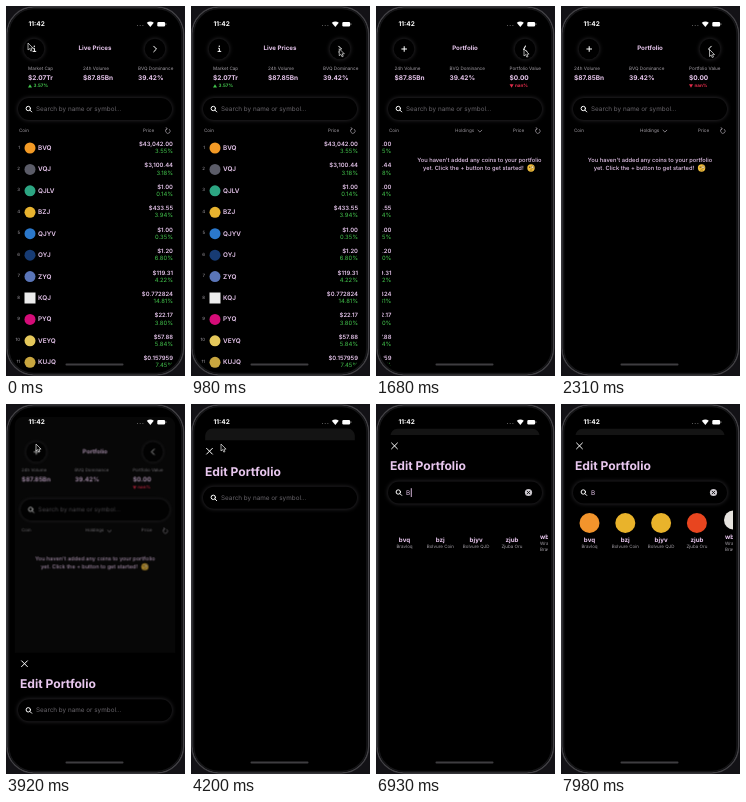
An HTML page for the animation above (8 s loop, 179 by 370 pixels).

```html
<!DOCTYPE html>
<html lang="en">
<head>
<meta charset="utf-8">
<title>Live Prices</title>
<style>
  html, body { margin: 0; width: 100%; height: 100%; overflow: hidden; background: #131216; }
  svg { display: block; width: 100%; height: 100%; }
  text { font-family: Inter, Roboto, sans-serif; dominant-baseline: central; text-rendering: geometricPrecision; }
  .glow { fill: #000; filter: drop-shadow(0 0 2.2px rgba(205, 195, 210, .25)); }
  .line { fill: none; stroke: #fff; stroke-width: 1; stroke-linecap: round; stroke-linejoin: round; }
</style>
</head>
<body>
<svg id="stage" viewBox="0 0 179 370"></svg>
<script>
const LOOP = 8000, STEP = 70;
const ACCENT = '#e8c7ee', GRAY = '#a5a0a8', DIM = '#68656b', GREEN = '#43c64d', RED = '#e22d4b';

const text = (x, y, str, size, fill, weight = 400, anchor = 'start') =>
  `<text x="${x}" y="${y}" font-size="${size}" fill="${fill}" font-weight="${weight}" text-anchor="${anchor}">${str}</text>`;
const disc = (x, y, r, fill) => `<circle cx="${x}" cy="${y}" r="${r}" fill="${fill}"/>`;
const line = (d, extra = '') => `<path class="line" d="${d}" ${extra}/>`;
const group = (id, content) => `<g id="${id}">${content}</g>`;

const coins = [
  ['BVQ', '43,042.00', '3.55', '#f39a25'],
  ['VQJ', '3,100.44', '3.18', '#5b5c68'],
  ['QJLV', '1.00', '0.14', '#2ca582'],
  ['BZJ', '433.55', '3.94', '#e8b32f'],
  ['QJYV', '1.00', '0.35', '#2b78cb'],
  ['OYJ', '1.20', '6.80', '#173b73'],
  ['ZYQ', '119.31', '4.22', '#5a75b8'],
  ['KQJ', '0.772824', '14.81', '#ececec'],
  ['PYQ', '22.17', '3.80', '#d50c78'],
  ['VEYQ', '57.88', '5.84', '#e5c85b'],
  ['KUJQ', '0.157959', '7.45', '#c9a63f']
];

const results = [
  ['bvq', 'Bravloq', '#f2942c'],
  ['bzj', 'Bolvure Coin', '#e9b32b'],
  ['bjyv', 'Bolvure QJD', '#e9b32b'],
  ['zjub', 'Zjuba Oru', '#e8451f']
];

const searchBar = (y, label) => `
  <rect class="glow" x="12" y="${y - 11}" width="154" height="22" rx="11"/>
  <circle class="line" cx="22.3" cy="${y - .5}" r="2.2"/>
  ${line(`M24 ${y + 1.2}l1.7 1.7`)}${label}`;
const placeholder = y => text(30, y, 'Search by name or symbol...', 6.35, DIM);

const stat = (x, label, value, change = '') =>
  text(x, 63, label, 4.6, GRAY) + text(x, 72, value, 6.5, ACCENT, 700) + change;

function coinRow([name, price, change, color], i) {
  const y = 142 + i * 21.43;
  const icon = name === 'KQJ'
    ? `<rect x="18.5" y="${y - 5.5}" width="11" height="11" fill="${color}"/>`
    : disc(24, y, 5.5, color);
  return text(14, y, i + 1, 4.4, GRAY, 400, 'end') + icon +
    text(32, y, name, 6.4, ACCENT, 600) +
    text(167, y - 3.5, '$' + price, 5.9, ACCENT, 600, 'end') +
    text(167, y + 3.6, change + '%', 5.9, GREEN, 400, 'end');
}

const emptyNote =
  text(89, 154.5, "You haven't added any coins to your portfolio", 5.75, ACCENT, 500, 'middle') +
  text(83, 162.5, 'yet. Click the + button to get started!', 5.75, ACCENT, 500, 'middle') +
  disc(140.6, 162, 3.7, '#f0bd3c') + disc(139.2, 161.2, .6, '#4b3410') +
  '<circle cx="142" cy="161.2" r="1.3" fill="#f7e4ad" stroke="#7b5b22" stroke-width=".5"/>' +
  '<path d="M139.4 164.2q1.2-.7 2.4 0" fill="none" stroke="#5b3d10" stroke-width=".5"/>';

const home = `
  <rect id="card" x="6" y="7" width="166" height="356" rx="8"/>
  <g id="homeContent">
    <circle class="glow" cx="28" cy="43" r="10.3"/><circle class="glow" cx="149" cy="43" r="10.3"/>
    ${group('infoIcon', disc(28.3, 40.3, .7, '#fff') + line('M27.6 42.3h.8v3M27 45.4h2.8'))}
    ${group('plusIcon', line('M25.8 43h4.8M28.2 40.6v4.8'))}
    ${group('chevron', line('M-1.3 -2.8l2.8 2.8l-2.8 2.8', 'stroke-width="1.2"'))}
    ${text(89, 42.7, 'Live Prices', 6.2, ACCENT, 700, 'middle').replace('<text', '<text id="title"')}
    ${group('stats',
      stat(22, 'Market Cap', '$2.07Tr', `<path d="M22 81.6l2-3.4 2 3.4z" fill="${GREEN}"/>` + text(27.6, 80, '3.57%', 4.6, GREEN, 700)) +
      stat(77, '24h Volume', '$87.85Bn') +
      stat(132, 'BVQ Dominance', '39.42%') +
      stat(192, 'Portfolio Value', '$0.00', `<path d="M192 78.3h4l-2 3.4z" fill="${RED}"/>` + text(197.4, 80, 'nan%', 4.6, RED, 700)))}
    ${searchBar(103, placeholder(103))}
    ${text(13, 125, 'Coin', 4.6, GRAY)}
    ${group('holdings', text(79, 125, 'Holdings', 4.6, GRAY) + line('M102 124.2l1.9 1.8 1.9-1.8', 'style="stroke:#a5a0a8;stroke-width:.8"'))}
    ${text(137, 125, 'Price', 4.6, GRAY)}
    ${line('M163.5 123.4a2.3 2.3 0 1 1-2.4-.5l-.9-1.3m.9 1.3l-1.3.7', 'style="stroke:#a5a0a8;stroke-width:.7"')}
    ${group('prices', coins.map(coinRow).join(''))}
    ${group('empty', emptyNote)}
  </g>`;

const resultCells = results.map(([name, full], i) => {
  const x = 28.5 + i * 35.8;
  return text(x, 136, name, 6.2, ACCENT, 700, 'middle') + text(x, 143, full, 4.5, GRAY, 400, 'middle');
}).join('') + text(164, 133, 'wbvq', 6.2, ACCENT, 700) +
  text(164, 140, 'Wrapped', 4.5, GRAY) + text(164, 146, 'Bravloq', 4.5, GRAY);
const resultIcons = results.map(([, , color], i) => disc(28.5 + i * 35.8, 119, 10, color)).join('') +
  disc(172.5, 116, 9.5, '#e6e3df');

const sheet = `
  <path d="M6 363V36q0-5 5-5h156q5 0 5 5v400H6z"/>
  ${line('M15.6 39l5.8 5.8M21.4 39l-5.8 5.8', 'stroke-width="1.2"')}
  ${text(14, 61.8, 'Edit Portfolio', 12.1, ACCENT, 700)}
  ${searchBar(88.5, group('hint', placeholder(88.5)) + group('typed',
    text(30, 88.5, 'B', 6.35, ACCENT) + disc(152.5, 88.5, 3.6, '#c9c5cb') +
    line('M151.2 87.2l2.6 2.6M153.8 87.2l-2.6 2.6', 'style="stroke:#000;stroke-width:.8"')))}
  <rect id="caret" y="84.2" width=".9" height="8.8" fill="${ACCENT}"/>
  ${group('names', resultCells)}${group('icons', resultIcons)}`;

const statusBar = text(22.5, 18.2, '11:42', 6.5, '#fff', 700) +
  [131.5, 134.2, 136.9].map(x => disc(x, 19.6, .5, '#777')).join('') +
  '<path d="M140.8 16.8q3.5-2.8 7 0l-3.5 4.1z" fill="#fff"/>' +
  '<rect x="151.3" y="15.9" width="7.8" height="4.5" rx="1.2" fill="#fff"/><path d="M159.9 17.3v1.7" stroke="#aaa" stroke-width=".7"/>';

document.getElementById('stage').innerHTML = `
  <clipPath id="screen"><rect x="6" y="7" width="166" height="356" rx="20"/></clipPath>
  <rect width="179" height="370" fill="#131216"/>
  <rect x="1" y="1" width="176.5" height="368" rx="27" fill="#000" stroke="#424145" stroke-width="1.5"/>
  <rect x="2.6" y="2.6" width="173.3" height="364.8" rx="25" fill="none" stroke="#151517" stroke-width="1.5"/>
  <g clip-path="url(#screen)">${group('home', home)}${group('sheet', sheet)}</g>
  ${statusBar}
  <rect x="59.5" y="357.6" width="58" height="1.8" rx=".9" fill="#3e3d40"/>
  <path id="cursor" d="M0 0v7l1.6-1.4 1.2 2.5 1.2-.6-1.1-2.4H5.1z" fill="#080808" stroke="#e4e4e4" stroke-width=".7"/>`;

const el = {};
document.querySelectorAll('#stage [id]').forEach(node => el[node.id] = node);

const clamp = v => Math.min(1, Math.max(0, v));
const smooth = v => v * v * (3 - 2 * v);

// Interpolates rows of [time, value...].
function track(rows, t, ease = v => v) {
  const next = rows.findIndex(row => row[0] > t);
  if (next === 0) return rows[0].slice(1);
  if (next < 0) return rows[rows.length - 1].slice(1);
  const a = rows[next - 1], b = rows[next];
  const k = ease((t - a[0]) / (b[0] - a[0]));
  return a.slice(1).map((v, i) => v + (b[i + 1] - v) * k);
}

// cubic-bezier(.4, 0, .2, 1)
function slide(x) {
  let lo = 0, hi = 1;
  for (let i = 0; i < 20; i++) {
    const s = (lo + hi) / 2;
    const at = 1.2 * s * (1 - s) ** 2 + .6 * s * s * (1 - s) + s ** 3;
    if (at < x) lo = s; else hi = s;
  }
  return smooth(lo);
}

const cursorPath = [
  [0, 22, 37], [840, 149, 42], [1050, 148, 43], [1960, 148, 43], [2170, 148.5, 43.5],
  [2870, 148.5, 43.5], [3710, 30, 40], [4200, 30, 40], [4550, 46, 87.5], [4770, 46, 87.5], [5040, 46.5, 88]
];
const caretFade = [
  [5250, 0], [5320, 1], [5880, 1], [6090, 0], [6230, 0], [6370, 1], [7560, 1], [7840, 0]
];

const move = (node, x, y = 0) => node.setAttribute('transform', `translate(${x} ${y})`);
const fade = (node, v) => node.setAttribute('opacity', v);

function render(t) {
  const portfolio = t >= 1190;
  const p = slide(clamp((t - 1170) / 780));
  el.title.textContent = portfolio ? 'Portfolio' : 'Live Prices';
  fade(el.infoIcon, +!portfolio);
  fade(el.plusIcon, +portfolio);
  el.chevron.setAttribute('transform', `translate(149 43) rotate(${180 * p})`);
  move(el.stats, -64 * p);
  move(el.prices, -166 * p);
  move(el.empty, 166 * (1 - p));
  fade(el.holdings, p);

  const a = Math.max(0, t - 3850) * .0174;
  const up = 1 - (1 + a) * Math.exp(-a);
  const shade = Math.round(20 * up);
  move(el.sheet, 0, 332 * (1 - up));
  el.home.setAttribute('transform', `translate(89 185) scale(${1 - .1 * up}) translate(-89 -185)`);
  el.card.setAttribute('fill', `rgb(${shade},${shade},${shade})`);
  fade(el.homeContent, 1 - .95 * up);

  const typed = t >= 6650;
  fade(el.hint, +!typed);
  fade(el.typed, +typed);
  el.caret.setAttribute('x', typed ? 34.8 : 29.8);
  fade(el.caret, track(caretFade, t)[0]);
  fade(el.names, clamp((t - 6580) / 350));
  fade(el.icons, clamp((t - 7140) / 210));

  move(el.cursor, ...track(cursorPath, t, smooth));
  fade(el.cursor, +(t < 6020));
}

let start;
function tick(now) {
  start ??= now;
  render(Math.floor((now - start) % LOOP / STEP) * STEP);
  requestAnimationFrame(tick);
}
render(0);
requestAnimationFrame(tick);
</script>
</body>
</html>
```
